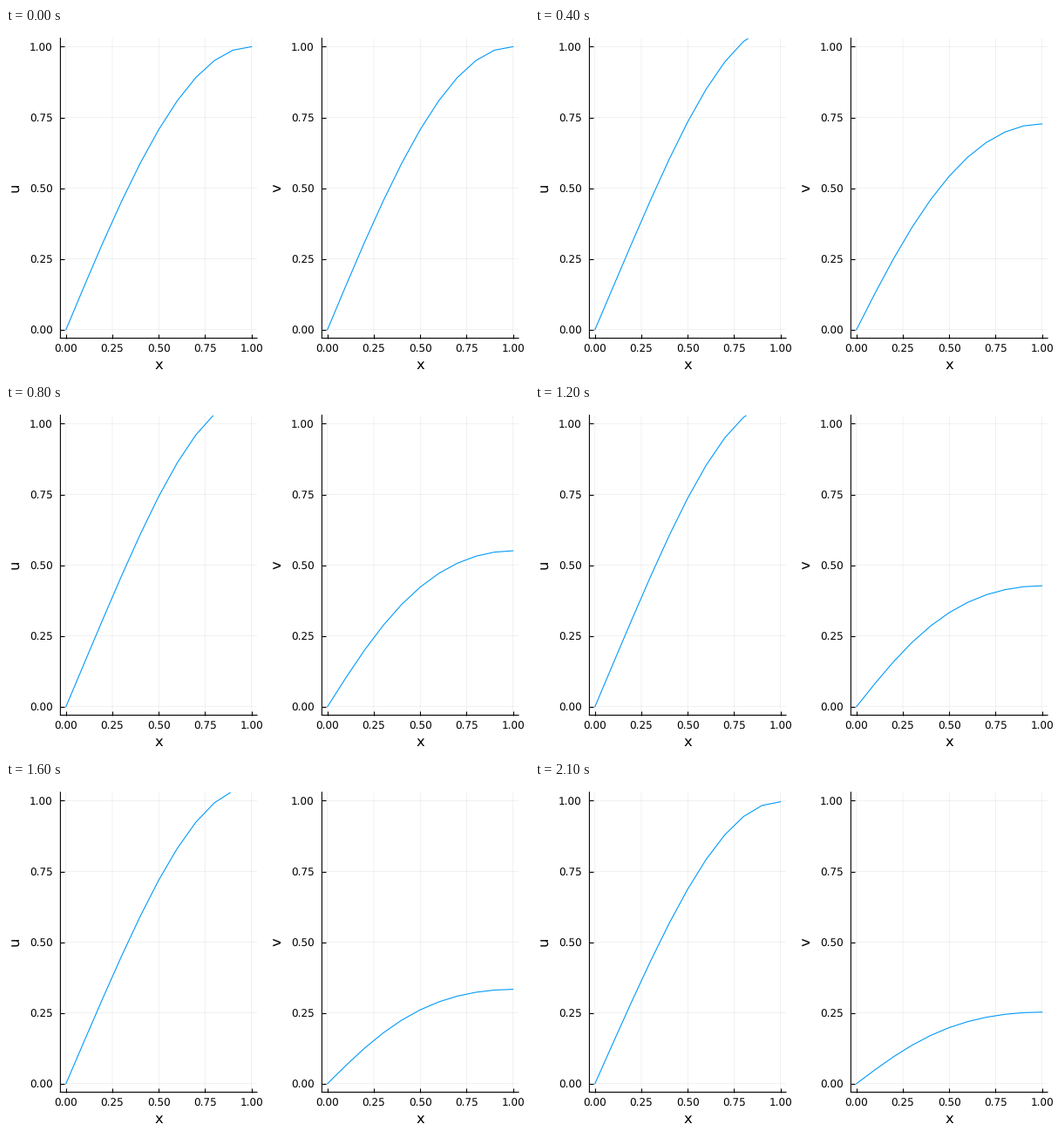
Recreate the animation shown at these times as a matplotlib script. Size 600 by 400 pixels, loop 2.2 s.

```python
import numpy as np
import matplotlib.pyplot as plt
from matplotlib.animation import FuncAnimation

W, H, DPI = 600, 400, 100
PT = 72 / DPI  # points per pixel
FRAMES = 22
TICKS = np.linspace(0, 1, 5)
LIM = (-0.03, 1.03)
TICK_SIZE, NAME_SIZE = 12, 16.4

plt.rcParams.update({"font.family": "DejaVu Sans", "text.hinting": "none"})

# Reaction-diffusion pair: u grows by u*v, v is used up by it.
DIFF = np.array([[0.196], [0.179]])
N = 11
DT = 0.001
x = np.linspace(0, 1, N)


def with_ends(s):
    """Fixed zero on the left, zero slope on the right."""
    s[:, 0] = 0
    s[:, -1] = (4 * s[:, -2] - s[:, -3]) / 3
    return s


def rate(s):
    s = with_ends(s.copy())
    d = np.zeros_like(s)
    d[:, 1:-1] = DIFF * (s[:, 2:] - 2 * s[:, 1:-1] + s[:, :-2]) * (N - 1) ** 2
    d += np.outer([1, -1], s[0] * s[1])
    return d


def solve():
    s = np.tile(np.sin(np.pi * x / 2), (2, 1))
    out = [s]
    for _ in range(round(1 / DT)):
        k1 = rate(s)
        k2 = rate(s + DT / 2 * k1)
        k3 = rate(s + DT / 2 * k2)
        k4 = rate(s + DT * k3)
        s = with_ends(s + DT / 6 * (k1 + 2 * k2 + 2 * k3 + k4))
        out.append(s)
    return np.array(out)


# Solver steps: long at first, then steady, with a short last one.
times = np.interp(np.arange(FRAMES), [0, 1, 4, 8, 20, 21],
                  [0, 0.073, 0.221, 0.417, 0.970, 1])
states = solve()[np.rint(times / DT).astype(int)]

fig = plt.figure(figsize=(W / DPI, H / DPI), dpi=DPI, facecolor="white")


def label(px, py, text, size, **kw):
    fig.text(px / W, 1 - py / H, text, fontsize=size * PT, va="baseline", **kw)


def panel(left, name):
    x0, x1, top, bottom = left, left + 225.6, 11.7, 355.5
    ax = fig.add_axes([x0 / W, 1 - bottom / H, (x1 - x0) / W, (bottom - top) / H])
    ax.set(xlim=LIM, ylim=LIM, xticks=TICKS, yticks=TICKS)
    ax.spines[["top", "right"]].set_visible(False)
    for side in ("left", "bottom"):
        ax.spines[side].set(linewidth=1.1 * PT, snap=False)
    ax.tick_params(direction="in", length=5 * PT, width=1.1 * PT,
                   labelleft=False, labelbottom=False)
    ax.grid(color="black", alpha=0.1, linewidth=0.55 * PT, snap=False)
    ax.set_axisbelow(True)
    for mark in ax.get_xticklines() + ax.get_yticklines():
        mark.set_snap(False)

    span = LIM[1] - LIM[0]
    for t in TICKS:
        f = (t - LIM[0]) / span
        label(x0 + f * (x1 - x0), 372, f"{t:.2f}", TICK_SIZE, ha="center")
        label(x0 - 8.7, bottom - f * (bottom - top) + 5, f"{t:.2f}", TICK_SIZE,
              ha="right")
    label((x0 + x1) / 2, 391.2, "x", NAME_SIZE, ha="center")
    label(x0 - 46.6, (top + bottom) / 2 - 0.8, name, NAME_SIZE, ha="center",
          rotation=90, rotation_mode="anchor")
    return ax.plot(x, np.zeros(N), color="#009AFA", linewidth=1.1 * PT)[0]


lines = [panel(62.4, "u"), panel(362.4, "v")]


def update(i):
    for line, y in zip(lines, states[i]):
        line.set_ydata(y)
    return lines


anim = FuncAnimation(fig, update, frames=FRAMES, interval=100, repeat=True,
                     repeat_delay=0)
plt.show()
```
